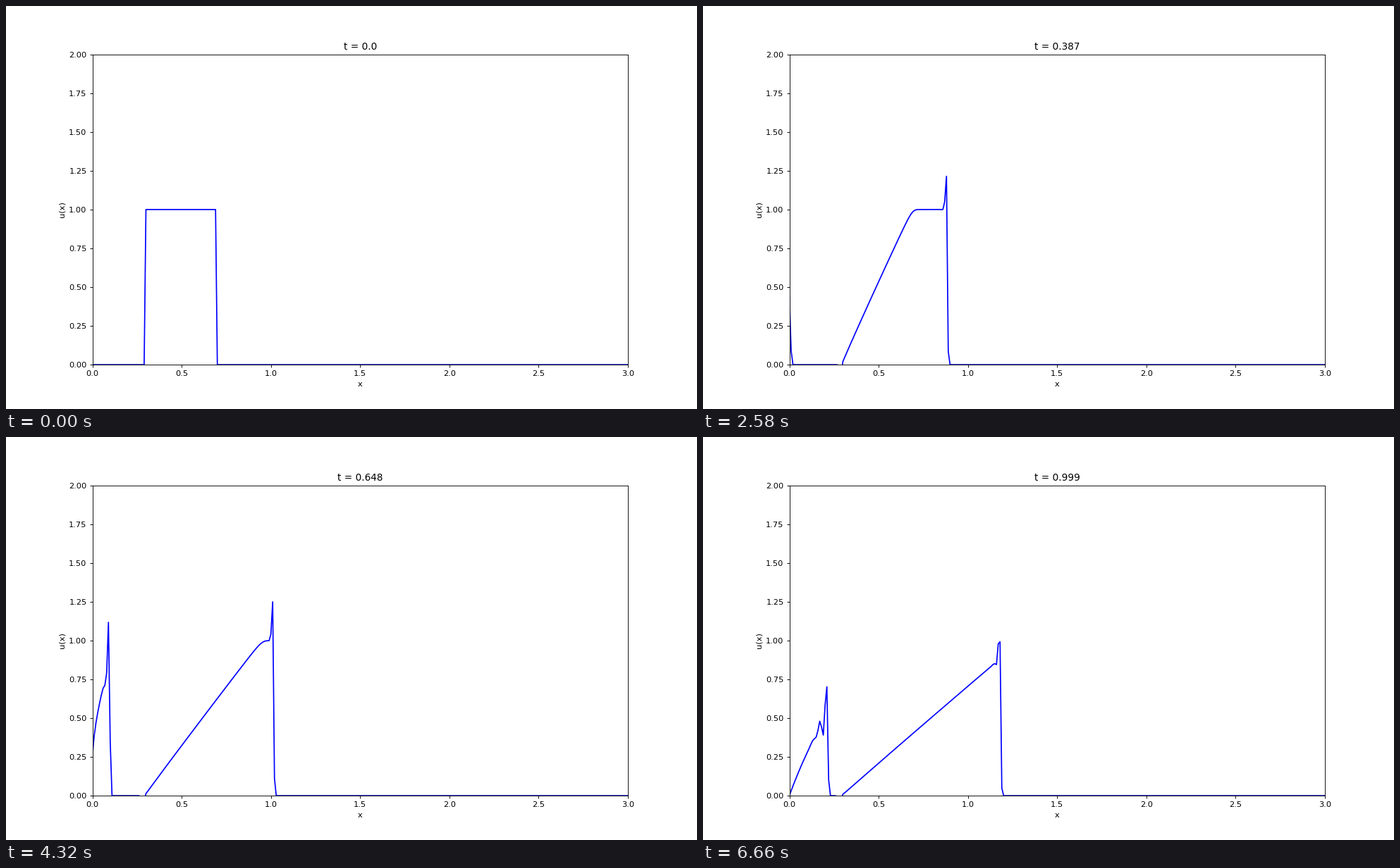
Animation, 980 px wide and 572 px high, one loop 6720 ms. Source, as a matplotlib script:

```python
import numpy as np
import matplotlib.pyplot as plt
from matplotlib.animation import FuncAnimation

plt.rcParams["font.family"] = "DejaVu Sans"

LENGTH, CELLS = 3.0, 300
DX, DT = LENGTH / CELLS, 0.009
STEPS, INTERVAL = 112, 60


def inflow(t):
    """Triangular pulse entering at x = 0."""
    return max(0.0, 1 - abs(t - 0.5) / 0.2)


def flux(u):
    return u**2 / 2


def advance(u, t):
    """One two-step Lax-Wendroff step of Burgers' equation, ending at time t."""
    ratio = DT / DX
    half = (u[1:] + u[:-1]) / 2 - ratio / 2 * np.diff(flux(u))
    new = u.copy()
    new[1:-1] -= ratio * np.diff(flux(half))
    new[0], new[-1] = inflow(t), 0
    return new


def solve():
    u = np.zeros(CELLS + 1)
    u[30:70] = 1
    states = [u]
    for n in range(1, STEPS):
        states.append(advance(states[-1], n * DT))
    return states


x = np.linspace(0, LENGTH, CELLS + 1)
states = solve()

# 980 x 572 pixels, with text and lines sized for a 12 inch wide figure
fig, ax = plt.subplots(figsize=(12, 7.004), dpi=81.67)
line, = ax.plot(x, states[0], color="blue")
ax.set(xlim=(0, LENGTH), ylim=(0, 2), xlabel="x", ylabel="u(x)")
title = ax.set_title("t = 0.0")


def update(n):
    line.set_ydata(states[n])
    title.set_text(f"t = {round(n * DT, 3)}")
    return line, title


anim = FuncAnimation(fig, update, frames=STEPS, interval=INTERVAL,
                     repeat=True, repeat_delay=0, blit=False)
plt.show()
```
